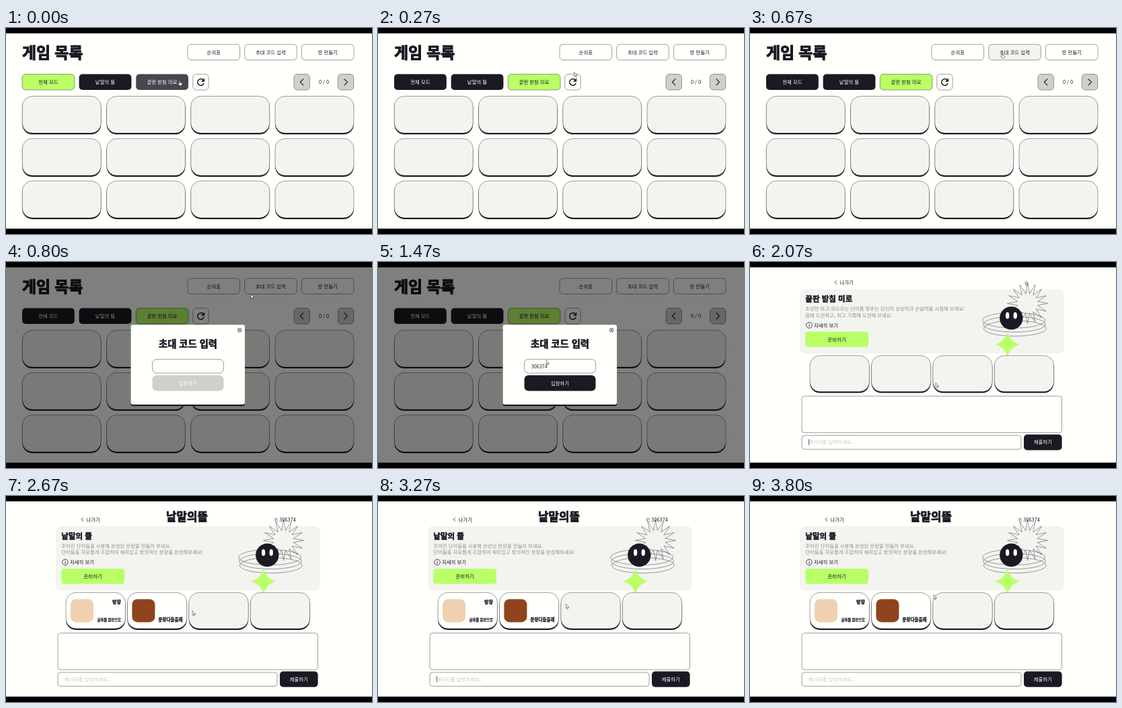
Animation of 544x306 px, one loop 3.94 s. Source, as an HTML page:

```html
<!DOCTYPE html>
<html lang="ko">
<head>
<meta charset="utf-8">
<title>게임 목록</title>
<style>
  html, body { margin: 0; width: 100%; height: 100%; overflow: hidden; background: #000; }
  svg { display: block; width: 100vw; height: 100vh; }
  text { font-family: "Noto Sans CJK KR", "Noto Sans CJK JP", "Noto Sans CJK", sans-serif; white-space: pre; }
  text[font-weight="900"] { stroke: #191a23; stroke-width: .045em; stroke-linejoin: round; }
</style>
</head>
<body>
<svg id="stage" viewBox="0 0 544 306"></svg>
<script>
const LOOP = 3940;
const INK = '#191a23', PAPER = '#fffffb', PALE = '#f3f3f0', LIME = '#b9ff66';
const HOVER = '#474750', DISABLED = '#cfcfcb', MUTED = '#8f8f8f', HINT = '#c8c8c8';
const MODE_A = '낱말의 뜰', MODE_B = '끝판 받침 미로', CODE = '306374';
const stage = document.getElementById('stage');

const rect = (x, y, w, h, r, fill, line = 'none') =>
  `<rect x="${x}" y="${y}" width="${w}" height="${h}" rx="${r}" fill="${fill}" stroke="${line}" stroke-width=".42"/>`;

const text = (x, y, s, { size = 7.4, fill = INK, anchor = 'start', weight = 400 } = {}) =>
  `<text x="${x}" y="${y}" font-size="${size}" fill="${fill}" text-anchor="${anchor}" font-weight="${weight}">${s}</text>`;

const line = (d, width = .42, fill = 'none') =>
  `<path d="${d}" fill="${fill}" stroke="${INK}" stroke-width="${width}" stroke-linecap="round" stroke-linejoin="round"/>`;

const ellipse = (x, y, rx, ry, fill, stroke = 'none', width = .42) =>
  `<ellipse cx="${x}" cy="${y}" rx="${rx}" ry="${ry}" fill="${fill}" stroke="${stroke}" stroke-width="${width}"/>`;

const move = (x, y, content) => `<g transform="translate(${x} ${y})">${content}</g>`;

const button = (x, y, w, h, label, fill, color = INK, edge = 'none', r = 5) =>
  rect(x, y, w, h, r, fill, edge) +
  text(x + w / 2, y + h / 2 + 2.7, label, { fill: color, anchor: 'middle' });

const card = (x, y, w, h, fill = PALE, r = 15) =>
  rect(x, y + 2, w, h, r, INK) + rect(x, y, w, h, r, fill, INK);

const columns = [24.2, 149.5, 274.8, 400];

function lobby(t) {
  const picked = t >= 200;
  const inviteHover = t >= 470 && t < 800;
  let out = text(24, 44.5, '게임 목록', { size: 22.8, weight: 900 });

  ['순위표', '초대 코드 입력', '방 만들기'].forEach((label, i) => {
    out += button(270 + i * 84.7, 24.3, 77.6, 23.2, label, i === 1 && inviteHover ? PALE : PAPER, INK, INK);
  });

  out += picked
    ? button(24, 68.6, 77.8, 23.4, '전체 모드', INK, PAPER)
    : button(24, 68.6, 77.8, 23.4, '전체 모드', LIME, INK, INK);
  out += button(108.6, 68.6, 77.8, 23.4, MODE_A, INK, PAPER);
  out += picked
    ? button(193.2, 68.6, 77.8, 23.4, MODE_B, LIME, INK, INK)
    : button(193.2, 68.6, 77.8, 23.4, MODE_B, HOVER, PAPER);

  out += rect(277.8, 68.6, 23.4, 23.4, 5, PAPER, INK);
  out += line('M294 82.2A4.8 4.8 0 1 1 292.8 76.9L294 78.1', 1.5);
  out += `<path d="M295.2 74.4v5.4h-5.4z" fill="${INK}"/>`;

  out += rect(428, 68.6, 23.4, 23.4, 5, DISABLED, INK) + line('M441.8 75.8L437.4 80.3L441.8 84.8', 1.2);
  out += rect(493.4, 68.6, 23.4, 23.4, 5, DISABLED, INK) + line('M503 75.8L507.4 80.3L503 84.8', 1.2);
  out += text(472.5, 83, '0 / 0', { anchor: 'middle' });

  for (const y of [101.3, 164.3, 227.2])
    for (const x of columns) out += card(x, y, 117, 54.8);

  return t >= 800 ? out + modal(t) : out;
}

function modal(t) {
  const filled = t >= 1470;
  const fill = !filled ? DISABLED : t >= 1800 ? HOVER : INK;
  return `<rect width="544" height="306" opacity=".5"/>` +
    rect(185.5, 95, 169.5, 119, 3, INK) +
    rect(185.5, 93.2, 169.5, 118.6, 3, PAPER) +
    ellipse(347.2, 101.2, 2.8, 2.8, 'none', INK, .7) +
    line('M346 100l2.4 2.4m0-2.4l-2.4 2.4', .7) +
    text(270.5, 127, '초대 코드 입력', { size: 14.3, weight: 900, anchor: 'middle' }) +
    rect(217.5, 144.6, 106, 20.4, 6, PAPER, INK) +
    (filled ? text(227.8, 157.5, CODE, { size: 7.2 }) : '') +
    button(217.5, 168.3, 106, 23.2, '입장하기', fill, PAPER, 'none', 6);
}

function burst(x, y, points, outer, inner) {
  const path = Array.from({ length: points * 2 }, (_, i) => {
    const a = i * Math.PI / points - Math.PI / 2, r = i % 2 ? inner : outer;
    return `${(x + r * Math.cos(a)).toFixed(1)} ${(y + r * Math.sin(a)).toFixed(1)}`;
  });
  return line(`M${path.join('L')}Z`);
}

const mascot = () =>
  [91, 97, 103].map((y, i) => ellipse(393 + (i - 1) * .8, y, 46.5, 11.5, 'none', INK)).join('') +
  burst(412.5, 66, 16, 30, 15) +
  ellipse(388.3, 87.8, 17.2, 17.2, INK) +
  ellipse(382.6, 84, 2.7, 5, PAPER) + ellipse(394.2, 84, 2.7, 5, PAPER) +
  move(382.7, 126.8, `<path d="M0-18Q4-4 18 0Q4 4 0 18Q-4 4-18 0Q-4-4 0-18Z" fill="${LIME}"/>`);

const back = (x, y) => line(`M${x + 2.6} ${y - 2.4}l-2.4 2.4l2.4 2.4`, .8) + text(x + 7.5, y + 2.7, '나가기');

const copyIcon = (x, y) => rect(x - 2, y - 2.5, 3, 4, .6, 'none', INK) + rect(x - .8, y - 1.2, 3, 4, .6, PAPER, INK);

function player(x, skin, name, size, host) {
  return rect(x + 7, 153.2, 34, 34.2, 8, skin) +
    (host ? text(x + 82, 160, '방장', { size: 7, weight: 900, anchor: 'end' }) : '') +
    text(x + 82, 186, name, { size, weight: 900, anchor: 'end' });
}

function room(t) {
  const joined = t >= 2200;
  const caret = (t - 2070) % 1060 < 530 && t < 3670;
  const header = joined
    ? back(112, 35) + copyIcon(401.5, 35.3) + text(406.3, 37.9, CODE) +
      text(269, 37, '낱말의뜰', { size: 16.8, weight: 900, anchor: 'middle' })
    : back(126, 30.3) + copyIcon(411, 32);
  const about = joined
    ? ['주어진 단어들을 사용해 완성된 문장을 만들어 보세요.',
       '단어들을 자유롭게 조합하여 재미있고 창의적인 문장을 완성해보세요!']
    : ['초성만 보고 떠오르는 단어를 맞추는 당신의 상상력과 순발력을 시험해 보세요!',
       '함께 도전하고, 최고 기록에 도전해 보세요.'];

  let body = rect(74, 45, 393, 95.5, 8, PALE) +
    text(82.3, 63.7, joined ? MODE_A : MODE_B, { size: 11.5, weight: 900 });
  about.forEach((s, i) => { body += text(82.3, 76.8 + i * 9.5, s, { size: 7.35, fill: MUTED }); });
  body += ellipse(88, 98.3, 4.3, 4.3, 'none', INK, .8) + line('M88 98v2.3M88 96.1v.1', .9) +
    text(95, 101, '자세히 보기') +
    button(82.3, 108, 93.7, 22.6, '준비하기', LIME, INK, 'none', 4) +
    mascot();

  for (let i = 0; i < 4; i++)
    body += card(89 + i * 91.4, 143.4, 88.4, 53.6, joined && i < 2 ? PAPER : PALE);
  if (joined)
    body += player(89, '#efd0b0', '글자를 품안으로', 5.3, true) + player(180.4, '#8f431f', '문장다듬을래', 6.5, false);

  body += rect(77, 203.6, 386.5, 54.4, 4, PAPER, INK) +
    rect(77, 262, 326, 20.6, 4, PAPER, INK) +
    text(87, 274.8, '메시지를 입력하세요...', { fill: HINT }) +
    (caret ? line('M87.5 268v8', .7) : '') +
    button(407, 260.6, 56.6, 23.2, '제출하기', INK, PAPER);

  return header + move(0, joined ? 0 : -4.4, body);
}

// Pointer path: time, x, y
const path = [
  [0, 258, 78], [200, 262, 76], [470, 376, 37], [670, 375, 37], [800, 364, 48],
  [1070, 256, 142], [1200, 250, 146], [1470, 250, 146], [1800, 277, 181],
  [2070, 276, 180], [2670, 277, 171], [3200, 279, 162], [3670, 281, 154], [3800, 273, 147], [LOOP, 273, 147]
];

function pointer(t) {
  const i = path.findIndex(p => p[0] > t);
  const [t0, x0, y0] = path[i - 1], [t1, x1, y1] = path[i];
  const k = (t - t0) / (t1 - t0);
  const hand = t < 270 || (t >= 470 && t < 800) || (t >= 1800 && t < 2070);
  const shape = hand
    ? 'M-.7 .6Q0-.4 .7 .6V3L3.2 3.6Q4 3.9 3.8 5L3.2 7.5H-.4L-2.4 4.8Q-2.2 3.7-.7 4.8Z'
    : 'M0 0V6L1.4 4.8L2.4 7L3.3 6.6L2.4 4.5H4.2Z';
  return move(x0 + (x1 - x0) * k, y0 + (y1 - y0) * k, line(shape, .5, '#fff'));
}

function draw(t) {
  stage.innerHTML = rect(0, 8, 544, 290, 0, PAPER) + (t < 2070 ? lobby(t) : room(t)) + pointer(t);
}

const snap = t => Math.floor(t / 200) * 200 + (t % 200 >= 70 ? 70 : 0);

const start = performance.now();
let shown = -1;
function tick() {
  const t = snap((performance.now() - start) % LOOP);
  if (t !== shown) draw(shown = t);
  requestAnimationFrame(tick);
}
tick();
</script>
</body>
</html>
```
